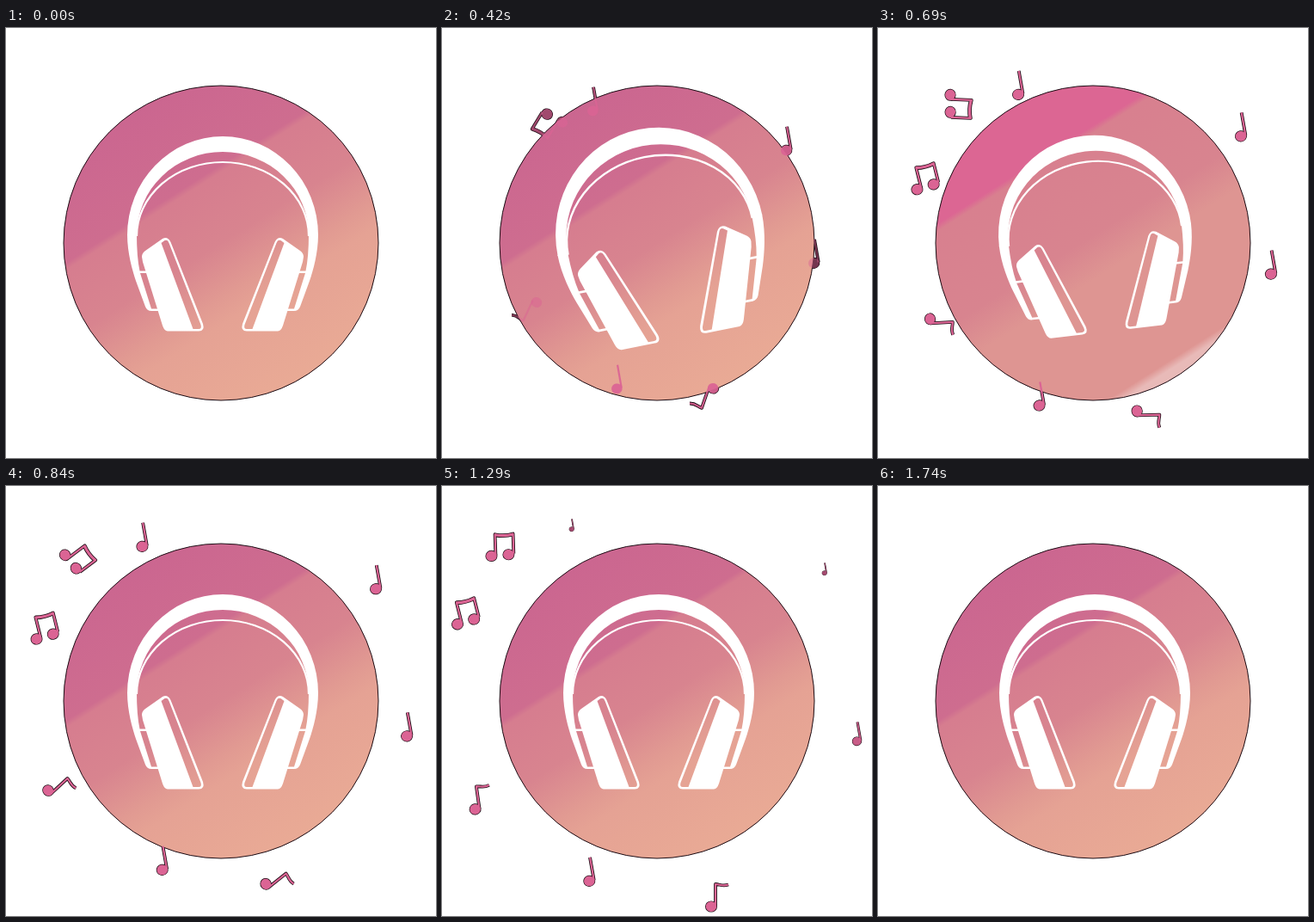
An HTML page with a canvas that plays this animation: 500x500 px, repeating every 2.04 s.

```html
<!DOCTYPE html>
<html lang="en">
<head>
<meta charset="utf-8">
<title>Headphones</title>
<style>
  html, body { margin: 0; width: 100%; height: 100%; overflow: hidden; background: #fff; }
  canvas { display: block; width: 100vmin; height: 100vmin; }
</style>
</head>
<body>
<canvas id="stage" width="500" height="500"></canvas>
<script>
const ctx = document.getElementById('stage').getContext('2d');
const LOOP = 2040, STEP = 30;
const PINK = '#db6494', DARK = '#1c0c14';

const clamp = v => Math.max(0, Math.min(1, v));
const mix = (a, b, p) => a + (b - a) * p;
const wave = u => (1 - Math.cos(Math.PI * clamp(u))) / 2;

function gradient(stops) {
  const g = ctx.createLinearGradient(152, 95, 348, 405);
  stops.forEach(([at, color]) => g.addColorStop(at, color));
  return g;
}
const softFill = gradient([
  [0, '#cb6690'], [.29, '#ce6d8f'], [.31, '#d67d8f'], [.5, '#d8848f'],
  [.65, '#e19a92'], [.72, '#e5a294'], [1, '#e9aa95']]);
const vividFill = gradient([
  [0, '#dc6693'], [.185, '#dc6693'], [.205, '#d8808f'], [.48, '#d8848f'],
  [.6, '#de9592'], [.945, '#de9592'], [.97, '#e8bab8'], [1, '#e8bab8']]);

const disc = new Path2D();
disc.arc(250, 250, 183, 0, 7);

// Headphones: the band, and the left side that is mirrored at x = 252
const band = new Path2D('M141 241A111 115 0 0 1 363 241H352A100 97 0 0 0 152 241Z');
const wire = new Path2D('M152 242A100 86 0 0 1 352 242');
const arm = new Path2D('M141 240C141 262 147 282 151 294L162 324Q164 329 169 329H179V326.5H169L156 285H165V282.5H155.5Q152 266 152 240Z');
const cup = new Path2D('M158 266Q158 262 162 259L182 245Q188 242 191.500 249L229 344Q231.500 352.500 224 352.500L188 352.500Q184 352 182 346L159 272Z' +
  'M180.500 250L184.500 247Q188 245.500 189.500 250L226.500 345Q228 350 224 350H217.500Z');

// Notes, centred on their own middle
const head = (x, y) => `M${x - 6.3} ${y}a6.300 5.900 0 1 0 12.600 0a6.300 5.900 0 1 0 -12.600 0Z`;
const glyph = (heads, lines) => ({ heads: new Path2D(heads), lines: new Path2D(lines) });
const single = glyph(head(-3, 13), 'M2.500 13V-14');
const flagged = glyph(head(-7, 11), 'M-2 11V-15c5 0 8 3 15 0.500');
const pair = glyph(head(-13, 13) + head(7, 12), 'M-8 12V-12Q3 -9.500 13 -12V11M-8 -11Q3 -8.500 13 -11');

// shape, start x/y, end x/y, resting angle, spin, fade-in time, shrink time
const notes = [
  [single, 176, 83, 151, 44.5, -10, 0, 300, 1170],
  [single, 401, 129, 445, 95.5, -10, 0, 280, 1170],
  [single, 433, 260, 483, 286, -10, 0, 350, 1250],
  [single, 204, 406, 172, 446, -10, 0, 280, 1300],
  [pair, 122, 114, 70, 68, -2, 213, 315, 1400],
  [pair, 81.5, 198, 27.5, 145, -14, 0, 430, 1480],
  [flagged, 305, 427, 320, 478, 0, 199, 280, 1340],
  [flagged, 99, 326, 44, 364, -8, 213, 345, 1320]
];

function drawNote([shape, x0, y0, x1, y1, rest, spin, show, hide], t, shadow) {
  const shown = clamp((t - show) / 150);
  const left = clamp(1 - (t - hide) / 210);
  if (shown < .1 || !left) return;
  const p = (1 - Math.exp((420 - t) / 540)) / .8;
  const turn = rest + spin * Math.max(0, 1 - p) ** 1.2;
  ctx.save();
  ctx.translate(mix(x0, x1, p), mix(y0, y1, p));
  ctx.rotate(turn * Math.PI / 180);
  ctx.scale(left, left);
  ctx.globalAlpha = shadow ? 1 : shown * (.5 + left / 2);
  ctx.fillStyle = ctx.strokeStyle = shadow ? DARK : PINK;
  ctx.lineJoin = 'round';
  ctx.lineWidth = shadow ? 3.8 : 2.2;
  ctx.stroke(shape.lines);
  ctx.fill(shape.heads);
  if (shadow) {
    ctx.lineWidth = 1.4;
    ctx.stroke(shape.heads);
  }
  ctx.restore();
}

function drawHeadphones(t) {
  const grow = .102 * Math.sin(Math.PI * clamp((t - 240) / 480)) ** 1.3;
  const tilt = -15.4 * (t < 515 ? wave((t - 240) / 275) : wave((840 - t) / 325));
  ctx.save();
  ctx.translate(252 + 9 * grow, 238);
  ctx.rotate(tilt * Math.PI / 180);
  ctx.scale(1 + grow, 1 + grow);
  ctx.translate(-252, -238);
  ctx.fillStyle = ctx.strokeStyle = '#fff';
  ctx.lineWidth = 2.2;
  ctx.fill(band);
  ctx.stroke(wire);
  for (let side = 0; side < 2; side++) {
    ctx.fill(arm);
    ctx.fill(cup, 'evenodd');
    ctx.transform(-1, 0, 0, 1, 504, 0);
  }
  ctx.restore();
}

function draw(t) {
  ctx.fillStyle = '#fff';
  ctx.fillRect(0, 0, 500, 500);
  notes.forEach(n => drawNote(n, t, true));
  ctx.fillStyle = t >= 480 && t < 810 ? vividFill : softFill;
  ctx.fill(disc);
  ctx.strokeStyle = DARK;
  ctx.lineWidth = 1;
  ctx.stroke(disc);
  drawHeadphones(t);
  notes.forEach(n => drawNote(n, t, false));
}

function frame() {
  const t = performance.now() % LOOP;
  draw(Math.floor(t / STEP) * STEP);
  requestAnimationFrame(frame);
}
frame();
</script>
</body>
</html>
```
